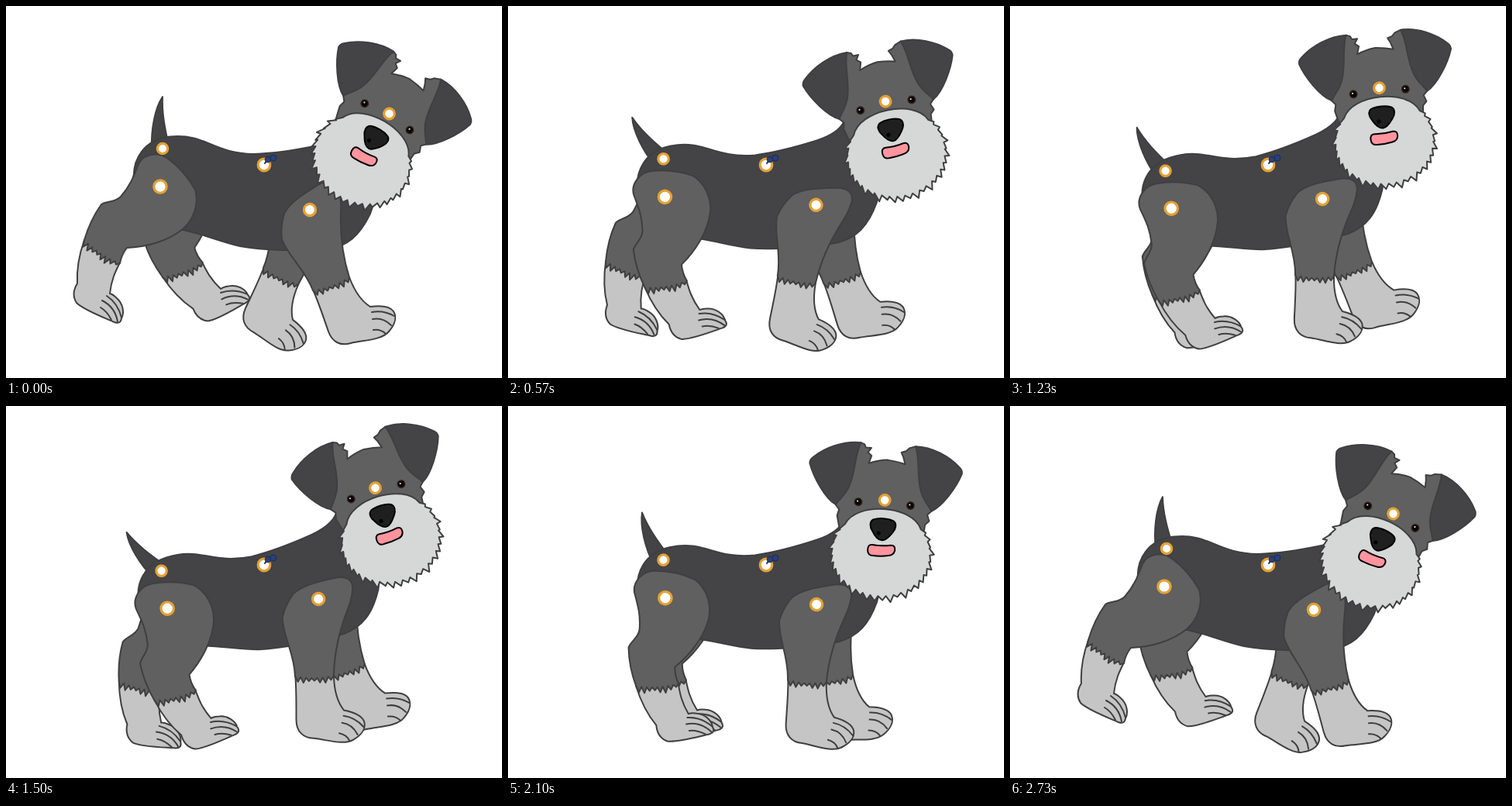
Recreate the animation shown at these times as an HTML page. Size 640x480 px, loop 2.76 s.

```html
<!DOCTYPE html>
<html lang="en">
<head>
<meta charset="utf-8">
<title>Walking dog puppet</title>
<style>
  html, body { margin: 0; width: 100%; height: 100%; overflow: hidden; background: #fff; }
  svg { display: block; width: 100%; height: 100%; }
  path { stroke: #3f3f41; stroke-width: 2; stroke-linejoin: round; stroke-linecap: round; }
  .dark { fill: #444446; }
  .coat { fill: #606060; }
  .paw { fill: #c5c5c5; }
  .beard { fill: #d6d8d7; }
  .line { fill: none; }
  .ring { fill: #fff; stroke: #e5a135; stroke-width: 3.2; }
  .ink { stroke: #000; }
</style>
</head>
<body>
<svg viewBox="0 0 640 480">
  <defs>
    <g id="hind">
      <path class="paw" d="M101,302 C94,322 91,340 92,358 C87,366 86,375 91,383 C100,392 124,401 140,408 Q148,411 149,403 C153,396 151,384 143,377 Q138,372 134,371 C136,353 141,343 147,331 Z"/>
      <path class="line" d="M130,374 C139,380 146,390 149,402 M124,380 C136,386 142,396 144,407 M122,389 C129,393 133,399 136,405"/>
      <path class="coat" id="thigh"/>
    </g>
    <g id="fore">
      <path class="paw" d="M396,366 C404,384 410,403 416,420 C421,434 432,439 445,435 C462,431 485,431 494,420 C501,412 505,402 500,394 C495,387 485,386 470,388 C457,380 449,366 443,350 Z"/>
      <path class="line" d="M472,395 C482,393 492,395 501,400 M473,404 C483,402 490,405 497,412 M474,418 C481,417 486,419 490,423"/>
      <path class="coat" id="shoulder"/>
    </g>
    <g id="ear">
      <path class="dark" d="M-63,10 C-77,3 -94,-23 -100,-41 Q-100,-46 -96,-49 C-82,-62 -58,-73 -36,-72 C-43,-55 -40,-34 -47,-15 C-51,-3 -58,2 -63,10 Z"/>
    </g>
    <g id="eye">
      <circle r="5.5" fill="#3a241c"/>
      <circle r="4" fill="#080606"/>
      <circle cx="-1" cy="-1" r="1.1" fill="#e8ddd8"/>
    </g>
  </defs>

  <g id="body">
    <path class="dark" id="tail" d="M188,184 C187,160 192,132 202,117 C201,138 205,158 210,180 Z"/>
    <use href="#hind" id="farHind"/>
    <use href="#fore" id="farFore"/>
    <path class="dark" d="M165,224 C163,198 178,172 212,168.5 C258,164 266,190 320,191 C350,190 378,185 402,180 C424,175 437,167 441,154 L496,150 C488,190 480,242 470,268 C456,297 440,310 415,314 C380,317 330,315 302,310 C272,303 255,294 224,288 L185,262 Z"/>
    <g id="nearHind">
      <use href="#hind"/>
      <circle class="ring" cx="199" cy="233" r="8.2"/>
    </g>
    <g id="nearFore">
      <use href="#fore"/>
      <circle class="ring" cx="392" cy="263" r="7.6"/>
    </g>
    <circle class="ring" cx="202" cy="184" r="6.7"/>
    <g id="head">
      <path class="coat" d="M-56,40 L-60,24 L-58,16 L-63,10 C-56,-4 -47,-15 -45,-38 Q-43,-58 -36,-72 L-31,-70 L-29,-66 L-22,-66 L-26,-60 L-21,-56 L-24,-46 Q-12,-51 0,-52 Q12,-51 23,-48 L20,-57 L17,-63 L23,-65 L27,-69 L35,-72 Q42,-58 44,-38 C46,-15 54,-4 61,10 L56,15 L59,23 L54,28 L53,40 Z"/>
      <use href="#ear"/>
      <use href="#ear" transform="scale(-.97,1)"/>
      <path class="beard" id="beard"/>
      <use href="#eye" x="-34" y="4.7"/>
      <use href="#eye" x="33.5" y="4.7"/>
      <path class="ink" fill="#1f1f1f" d="M-13,26 C-6,23 6,23 13,26 C18,29 17,36 13,41 C8,48 4,52 0,52 C-5,52 -9,48 -13,41 C-17,36 -18,29 -13,26 Z"/>
      <circle cx="-5" cy="43" r="2.6"/>
      <path class="ink" fill="#ff949f" d="M-12,58.5 Q0,60 12,57.5 Q18,57 17.5,64 Q16.5,70 10,71 Q0,73 -10,72.5 Q-17,73 -17.5,66 Q-18,58 -12,58.5 Z"/>
      <circle class="ring" r="6.8"/>
    </g>
  </g>

  <circle class="ring" cx="333" cy="205" r="7.8"/>
  <g fill="#29407a" stroke="#1b2b57" stroke-width="1">
    <path d="M334,203 L337,199" style="stroke:#1b2b57"/>
    <circle cx="338" cy="198" r="3.8"/>
    <circle cx="345" cy="196" r="4"/>
  </g>
</svg>
<script>
const LOOP = 2760, STEP = 30, SWING = 910;
const $ = id => document.getElementById(id);

// Ragged edge from left to right, teeth pointing down.
function ragged(x1, y1, x2, y2, teeth, depth) {
  const dx = x2 - x1, dy = y2 - y1, len = Math.hypot(dx, dy);
  let d = '';
  for (let i = 0; i <= teeth * 2; i++) {
    const u = i / (teeth * 2);
    const drop = (i % 2 ? depth * (0.75 + 0.3 * Math.sin(i * 2.4)) : 0) + 3 * Math.sin(Math.PI * u);
    d += `L${(x1 + dx * u - dy / len * drop).toFixed(1)},${(y1 + dy * u + dx / len * drop).toFixed(1)} `;
  }
  return d;
}

function beardPath() {
  const rx = 63, ry = 55, cy = 69, tufts = 28;
  const from = -0.68, to = Math.PI + 0.68;
  let d = '';
  for (let i = 0; i <= tufts; i++) {
    const a = from + (to - from) * i / tufts;
    const x = rx * Math.cos(a), y = cy + ry * Math.sin(a);
    const spike = 4.5 + 2.5 * Math.sin(i * 2.7);
    d += `${i ? 'L' : 'M'}${x.toFixed(1)},${y.toFixed(1)} `;
    if (i < tufts) {
      const b = a + 0.06 + 0.05 * Math.cos(a);
      d += `L${((rx + spike * 0.8) * Math.cos(b)).toFixed(1)},${(cy + (ry + spike) * Math.sin(b) + 2).toFixed(1)} `;
    }
  }
  return d + 'C-36,4 36,4 49,34 Z';
}

$('thigh').setAttribute('d',
  'M147,332 Q149,321 156,312 C180,311 209,304 229,287 C243,274 249,254 244,237 C235,221 224,208 209,197 ' +
  'C197,188 178,190 171,204 C164,222 160,232 148,246 C140,254 131,251 123,256 C113,270 106,285 101,302 ' +
  ragged(101, 302, 147, 332, 8, 8) + 'Z');
$('shoulder').setAttribute('d',
  'M443,350 C435,325 431,295 432,265 Q433,248 429,235 Q423,220 404,230 C385,242 366,253 359,268 ' +
  'Q354,285 356,301 C364,323 386,340 396,367 ' + ragged(396, 367, 443, 350, 7, 7) + 'Z');
$('beard').setAttribute('d', beardPath());

// Steady back-and-forth between 0 and 1 after an initial hold.
function sway(t, hold = 0, period = SWING) {
  if (t < hold) return 0;
  const u = (t - hold) / period % 1;
  return 1 - Math.abs(1 - 2 * u);
}

const FORE_STEPS = [[0, 0], [465, 49], [570, 36.5], [915, 0], [960, 7], [1375, 49],
  [1500, 31.5], [1800, 2], [1835, 0], [2285, 50], [2370, 41.5], [2730, 4]];

function lerpSteps(steps, t) {
  const i = steps.findIndex(s => s[0] >= t);
  if (i <= 0) return steps[0][1];
  const [t0, v0] = steps[i - 1], [t1, v1] = steps[i];
  return v0 + (v1 - v0) * (t - t0) / (t1 - t0);
}

function turn(id, angle, x, y, shift = '') {
  $(id).setAttribute('transform', `${shift} rotate(${angle.toFixed(2)} ${x} ${y})`);
}

function pose(t) {
  const fore = lerpSteps(FORE_STEPS, t);
  turn('body', -13.8 * sway(t, 0, SWING * 3), 333, 205);
  turn('tail', -36 * sway(t, 55), 202, 184);
  turn('nearHind', -49 * sway(t), 199, 233);
  turn('farHind', 50.5 * sway(t, 90) - 53, 199, 233, 'translate(7 -3)');
  turn('nearFore', fore, 392, 263);
  turn('farFore', 44.5 - fore, 392, 263, 'translate(10 -2)');
  turn('head', 30.5 - 41.5 * sway(t, 60), 0, 0, 'translate(494.5 139)');
}

const start = performance.now();
function frame() {
  const t = (performance.now() - start) % LOOP;
  pose(Math.floor(t / STEP) * STEP);
  requestAnimationFrame(frame);
}
frame();
</script>
</body>
</html>
```
